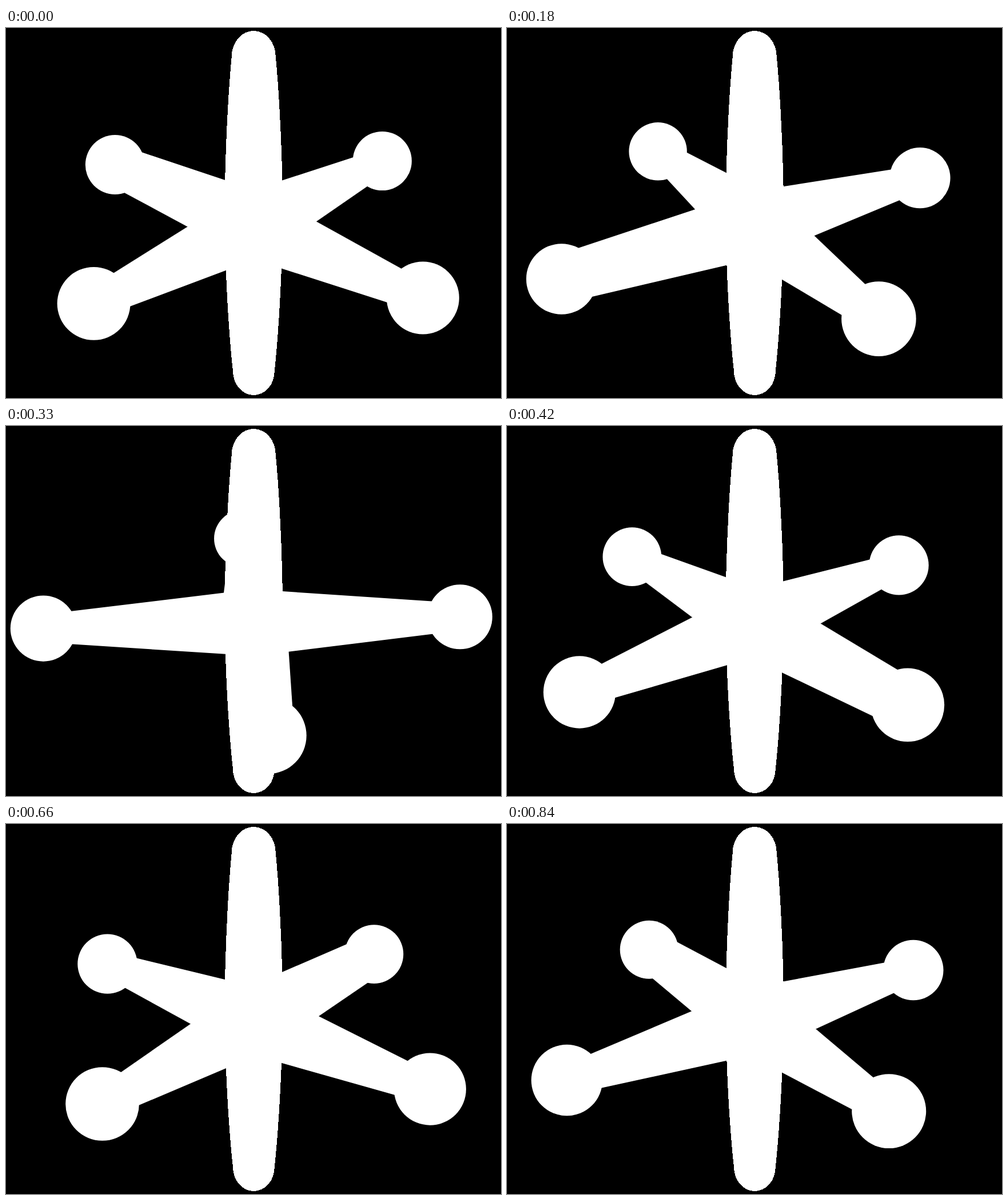
An HTML page without scripts that plays this animation: 866 px wide and 647 px high, repeating every 870 ms.

```html
<!DOCTYPE html>
<html lang="en">
<head>
<meta charset="utf-8">
<title>Spinning jack</title>
<style>
@property --turn {
  syntax: "<angle>";
  inherits: true;
  initial-value: 0deg;
}

html, body {
  margin: 0;
  width: 100%;
  height: 100%;
  overflow: hidden;
  background: #000;
}

.jack {
  position: absolute;
  left: 0;
  top: 0;
  width: 866px;
  height: 647px;
  overflow: hidden;
  animation: spin 870ms steps(29) infinite;
}

@keyframes spin {
  from { --turn: 0deg; }
  to { --turn: -360deg; }
}

.spindle, .rod, .ball {
  position: absolute;
  left: 0;
  top: 0;
  width: 866px;
  height: 647px;
}

.spindle { fill: #fff; shape-rendering: crispEdges; }
.rod, .ball { background: #fff; }

/* Each arm circles the hub, seen in perspective from slightly above. */
.arm {
  --hub-x: 433;
  --hub-y: 343.8;
  --hub-r: 58;
  --tip-r: 24;
  --angle: calc(var(--start) + var(--turn));
  --scale: calc(1 / (1 - 0.147 * sin(var(--angle))));
  --dx: calc(365.1 * cos(var(--angle)) * var(--scale));
  --dy: calc(168.8 * sin(var(--angle)) * var(--scale));
  --x: calc(var(--hub-x) + var(--dx));
  --y: calc(var(--hub-y) + var(--dy));
}

.arm.thick { --tip-r: 39; }

.ball {
  clip-path: circle(calc(57.1px * var(--scale)) at calc(var(--x) * 1px) calc(var(--y) * 1px));
}

/* Outline of a cone: lines tangent to a circle at the hub and one at the tip. */
.rod {
  --end-r: calc(var(--tip-r) * var(--scale));
  --taper: calc(var(--hub-r) - var(--end-r));
  --side: calc(1 / sqrt(var(--dx) * var(--dx) + var(--dy) * var(--dy) - var(--taper) * var(--taper)));
  --nx: calc(0 - var(--dy) * var(--side));
  --ny: calc(var(--dx) * var(--side));
  clip-path: polygon(
    calc((var(--hub-x) + var(--nx) * var(--hub-r)) * 1px) calc((var(--hub-y) + var(--ny) * var(--hub-r)) * 1px),
    calc((var(--x) + var(--nx) * var(--end-r)) * 1px) calc((var(--y) + var(--ny) * var(--end-r)) * 1px),
    calc((var(--x) - var(--nx) * var(--end-r)) * 1px) calc((var(--y) - var(--ny) * var(--end-r)) * 1px),
    calc((var(--hub-x) - var(--nx) * var(--hub-r)) * 1px) calc((var(--hub-y) - var(--ny) * var(--hub-r)) * 1px)
  );
}
</style>
</head>
<body>
<div class="jack">
  <svg class="spindle" viewBox="0 0 866 647">
    <path d="M394.8 50 A38.5 45 0 0 1 471.8 50
      C478.6 120 484 235 484 320
      C484 410 477.5 530 469.8 600
      A36.4 42 0 0 1 397 600
      C389 530 382.6 410 382.6 320
      C382.6 235 388 120 394.8 50Z"/>
  </svg>
  <div class="arm" style="--start: 43.1deg"><div class="rod"></div><div class="ball"></div></div>
  <div class="arm" style="--start: 133.1deg"><div class="rod"></div><div class="ball"></div></div>
  <div class="arm thick" style="--start: 223.1deg"><div class="rod"></div><div class="ball"></div></div>
  <div class="arm" style="--start: 313.1deg"><div class="rod"></div><div class="ball"></div></div>
</div>
</body>
</html>
```
